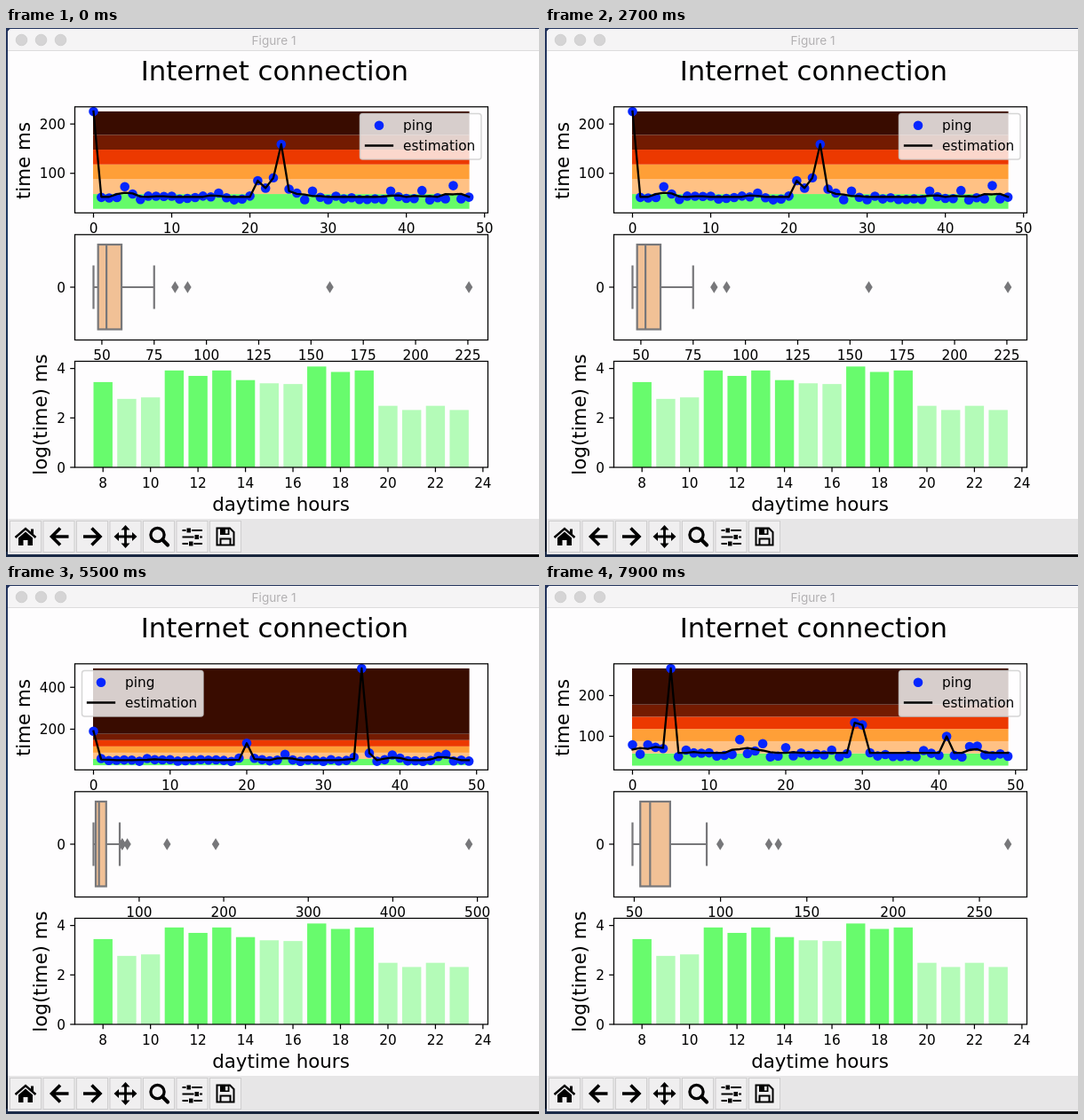
These frames come from a looping animation (600 by 596 pixels, 8000 ms). An HTML page:

```html
<!DOCTYPE html>
<html lang="en">
<head>
<meta charset="utf-8">
<title>Internet connection</title>
<style>
  html, body { margin: 0; width: 100%; height: 100%; overflow: hidden; background: #15203a; }
  svg { display: block; width: 600px; height: 596px; }
  text { font: 15.3px "DejaVu Sans", sans-serif; fill: #000; }
  .title { font-size: 30.75px; }
  .label { font-size: 21.4px; }
  .bar-title { font: 13.6px Inter, Roboto, sans-serif; fill: #b2b0b2; }
  .mid { text-anchor: middle; }
  .end { text-anchor: end; }
  .axis { fill: none; stroke: #000; stroke-width: 1.25; }
  .curve { fill: none; stroke: #000; stroke-width: 2.3; stroke-linejoin: round; stroke-linecap: square; }
  .dot { fill: #0526ff; }
  .box { fill: #f1c196; stroke: #77777a; stroke-width: 2.2; }
  .whisker { fill: none; stroke: #77777a; stroke-width: 2.2; }
  .flier { fill: #77777a; }
  .legend { fill: #fff; fill-opacity: .8; stroke: #ccc; stroke-opacity: .8; stroke-width: 1.5; }
  .button { fill: #f0eff0; stroke: #cfcecf; }
  .line { fill: none; stroke: #000; stroke-width: 3.6; }
  .thin { stroke-width: 2; }

  .scene { visibility: hidden; animation: 8s step-end infinite; }
  #scene0 { animation-name: first; }
  #scene1 { animation-name: second; }
  #scene2 { animation-name: third; }
  @keyframes first { 0% { visibility: visible; } 35%, 100% { visibility: hidden; } }
  @keyframes second { 0% { visibility: hidden; } 35% { visibility: visible; } 83.75%, 100% { visibility: hidden; } }
  @keyframes third { 0% { visibility: hidden; } 83.75%, 100% { visibility: visible; } }
</style>
</head>
<body>
<svg viewBox="0 0 600 596">
  <defs>
    <linearGradient id="desk" x2="0" y2="1">
      <stop offset="0" stop-color="#22335c"/>
      <stop offset=".45" stop-color="#1b3a63"/>
      <stop offset="1" stop-color="#0d1424"/>
    </linearGradient>
    <linearGradient id="floor">
      <stop offset="0" stop-color="#1a2a48"/>
      <stop offset=".6" stop-color="#182439"/>
      <stop offset="1" stop-color="#0a0c10"/>
    </linearGradient>
  </defs>
  <rect width="600" height="596" fill="url(#desk)"/>
  <rect y="590" width="600" height="6" fill="url(#floor)"/>
  <path d="M2 593V6q0-5 5-5H600V593Z" fill="#fefdfe"/>
  <path d="M2 25V6q0-5 5-5H600V25Z" fill="#f5f4f5"/>
  <path d="M2 25.5H600" stroke="#dddcdd"/>
  <g fill="#d5d4d5" stroke="#c8c7c8" stroke-width=".7">
    <circle cx="17.5" cy="13.5" r="6.3"/><circle cx="39.5" cy="13.5" r="6.3"/><circle cx="61.5" cy="13.5" r="6.3"/>
  </g>
  <text class="bar-title mid" x="301.5" y="18.5">Figure 1</text>
  <text class="title mid" x="302.3" y="59">Internet connection</text>
  <text class="label mid" transform="translate(26.6 149.5) rotate(-90)">time ms</text>
  <text class="label mid" transform="translate(46 435.5) rotate(-90)">log(time) ms</text>
  <text class="label mid" x="309.5" y="543.5">daytime hours</text>

  <g id="plots"></g>

  <path d="M2 553H600V593H2Z" fill="#e7e6e7"/>
  <g id="buttons"></g>
  <!-- home -->
  <path class="line" style="stroke-width:2.4" d="M10.5 574L22 564L33.5 574"/>
  <path d="M28 564.5h3v7l-3-2.6ZM14 574.5L22 567.5L30 574.5V583H24.5V577H19.5V583H14Z"/>
  <!-- back and forward -->
  <path id="arrow" class="line" d="M61 563.5L51.5 573L61 582.5M52 573H70.5"/>
  <use href="#arrow" transform="translate(157.5) scale(-1 1)"/>
  <!-- pan -->
  <path class="line" style="stroke-width:2.8" d="M134.5 564V582M125.5 573H143.5"/>
  <path d="M134.5 560l5 5.5h-10ZM134.5 586l5-5.5h-10ZM121.5 573l5.5-5v10ZM147.5 573l-5.5-5v10Z"/>
  <!-- zoom -->
  <circle class="line" cx="170.5" cy="571" r="7.6" style="stroke-width:3.3"/>
  <path class="line" d="M176 576.5L182 582.5" style="stroke-width:4.2;stroke-linecap:round"/>
  <!-- sliders -->
  <path class="line thin" d="M198.5 566H221M198.5 573.5H221M198.5 581H221"/>
  <path stroke="#f0eff0" d="M203 563h5.5v6h-5.5ZM212 570.5h5.5v6h-5.5ZM205.5 578h5.5v6h-5.5Z"/>
  <!-- save -->
  <path class="line thin" d="M237.5 563.5H252L256.5 568V582.5H237.5ZM241.5 582V575.5H252.5V582"/>
  <path d="M241 563.5H251.5V571H241Z"/>
  <path d="M247 565h2.7v4.5h-2.7Z" fill="#f0eff0"/>
</svg>
<script>
const LEFT = 77.5, RIGHT = 542.5, START = 98.5, SPAN = 422.6;
const bands = ["#65fb69", "#ffc184", "#ff9f37", "#ec3900", "#731b01", "#390c00"];

// low and spread bound the background noise in ms; peaks stand out of it
const scenes = [
  {
    count: 49, low: 46, spread: 8, quartiles: [48.2, 52.2, 59.4], yStep: 100, boxStep: 25, legendX: 398.5,
    peaks: { 0: 225.5, 4: 73, 5: 58, 16: 60, 21: 85, 22: 70, 23: 91, 24: 159, 25: 68, 26: 60, 28: 64, 38: 64, 42: 65, 46: 75 }
  },
  {
    count: 50, low: 46, spread: 9, quartiles: [48.6, 52.5, 61], yStep: 200, boxStep: 100, legendX: 85.5,
    peaks: { 0: 190.5, 1: 60, 7: 60, 19: 62, 20: 133, 21: 61, 25: 80, 34: 66, 35: 490, 36: 86, 39: 77, 40: 62, 45: 70, 46: 80 }
  },
  {
    count: 50, low: 49, spread: 11, quartiles: [53.5, 59.2, 70.8], yStep: 100, boxStep: 50, legendX: 398.5,
    peaks: { 0: 79, 2: 79, 3: 73, 4: 70, 5: 266.5, 7: 66, 14: 92, 16: 64, 17: 82, 20: 72, 26: 66, 29: 133.5, 30: 128, 38: 65, 41: 99.8, 44: 75, 45: 76 }
  }
];
const hours = [3.45, 2.77, 2.83, 3.92, 3.7, 3.92, 3.53, 3.4, 3.37, 4.08, 3.86, 3.92, 2.49, 2.32, 2.49, 2.32];

const range = (from, to, step) =>
  Array.from({ length: Math.floor((to - from) / step) + 1 }, (_, i) => from + i * step);
const mean = list => list.reduce((a, b) => a + b, 0) / list.length;
const noise = i => {
  const v = Math.sin(i * 12.9898 + 4) * 43758.5453;
  return v - Math.floor(v);
};

const rect = (x, y, w, h, attrs) => `<rect x="${x}" y="${y}" width="${w}" height="${h}" ${attrs}/>`;
const path = (d, cls) => `<path d="${d}" class="${cls}"/>`;
const text = (x, y, cls, s) => `<text x="${x}" y="${y}" class="${cls}">${s}</text>`;
const dot = (x, y) => `<circle cx="${x}" cy="${y}" r="5.3" class="dot"/>`;
const frame = (y0, y1) => rect(LEFT, y0, RIGHT - LEFT, y1 - y0, 'class="axis"');
const xTick = (x, y, s) => path(`M${x} ${y}v5.3`, "axis") + text(x, y + 22.7, "mid", s);
const yTick = (y, s) => path(`M${LEFT} ${y}h-5.3`, "axis") + text(67, y + 5.6, "end", s);

// Smooths the pings but follows sharp spikes.
function estimate(ping, [, median, q3]) {
  const calm = ms => ms < 1.4 * q3;
  return ping.map((ms, i) =>
    calm(ms) ? Math.max(median, mean(ping.slice(Math.max(0, i - 1), i + 2).filter(calm))) : ms);
}

function legend(x) {
  return rect(x, 96.5, 136.5, 51.5, 'rx="3" class="legend"') + dot(x + 21.5, 109.8) +
    path(`M${x + 6.5} 132.5h30`, "curve") +
    text(x + 48.5, 115.3, "", "ping") + text(x + 48.5, 138, "", "estimation");
}

function pingPlot(s, ping, top) {
  const px = i => START + i * SPAN / (s.count - 1);
  const py = ms => 94 + (top - ms) * 108.6 / (top - 30);
  const fills = bands.map((color, i) => {
    const low = 28 + 30 * i, high = i < 5 ? low + 30 : top;
    return rect(START - .5, py(high), SPAN + 1, py(low) - py(high), `fill="${color}"`);
  });
  const curve = estimate(ping, s.quartiles).map((ms, i) => `${px(i)} ${py(ms)}`);
  return fills.join("") +
    ping.map((ms, i) => dot(px(i), py(ms))).join("") +
    path("M" + curve.join("L"), "curve") +
    frame(88.8, 208.3) +
    range(0, 50, 10).map(i => xTick(px(i), 208.3, i)).join("") +
    range(s.yStep, top, s.yStep).map(ms => yTick(py(ms), ms)).join("") +
    legend(s.legendX);
}

function boxPlot(s, ping, top) {
  const bx = ms => START + (ms - s.low) * SPAN / (top - s.low);
  const [q1, median, q3] = s.quartiles;
  const limit = q3 + 1.5 * (q3 - q1);
  const high = Math.max(...ping.filter(ms => ms <= limit));
  const first = Math.ceil(s.low / s.boxStep) * s.boxStep;
  return path(`M${bx(s.low)} 292H${bx(q1)}M${bx(q3)} 292H${bx(high)}M${bx(s.low)} 267.5v49M${bx(high)} 267.5v49`, "whisker") +
    rect(bx(q1), 244, bx(q3) - bx(q1), 95.5, 'class="box"') +
    path(`M${bx(median)} 244v95.5`, "whisker") +
    ping.filter(ms => ms > limit)
      .map(ms => path(`M${bx(ms)} 285.3l4.2 6.7l-4.2 6.7l-4.2-6.7Z`, "flier")).join("") +
    range(first, top + .05 * (top - s.low), s.boxStep).map(ms => xTick(bx(ms), 351.5, ms)).join("");
}

function scene(s, id) {
  const ping = range(0, s.count - 1, 1).map(i => s.peaks[i] ?? s.low + s.spread * noise(i));
  const top = Math.max(...ping);
  return `<g class="scene" id="scene${id}">${pingPlot(s, ping, top)}${boxPlot(s, ping, top)}</g>`;
}

function hourPlot() {
  const hx = h => 109.2 + (h - 8) * 26.73;
  const hy = v => 495 - v * 27.85;
  return hours.map((v, i) =>
      rect(hx(i + 8) - 10.7, hy(v), 21.4, 495 - hy(v), `fill="${v > 3.42 ? "#68fb6d" : "#b4fbb8"}"`)).join("") +
    frame(375.5, 495) +
    range(8, 24, 2).map(h => xTick(hx(h), 495, h)).join("") +
    range(0, 4, 2).map(v => yTick(hy(v), v)).join("");
}

document.getElementById("plots").innerHTML =
  scenes.map(scene).join("") + frame(232.8, 351.5) + yTick(292, 0) + hourPlot();

document.getElementById("buttons").innerHTML =
  range(0, 6, 1).map(i => rect(4.5 + 37.5 * i, 555.5, 35, 35, 'class="button"')).join("");
</script>
</body>
</html>
```
